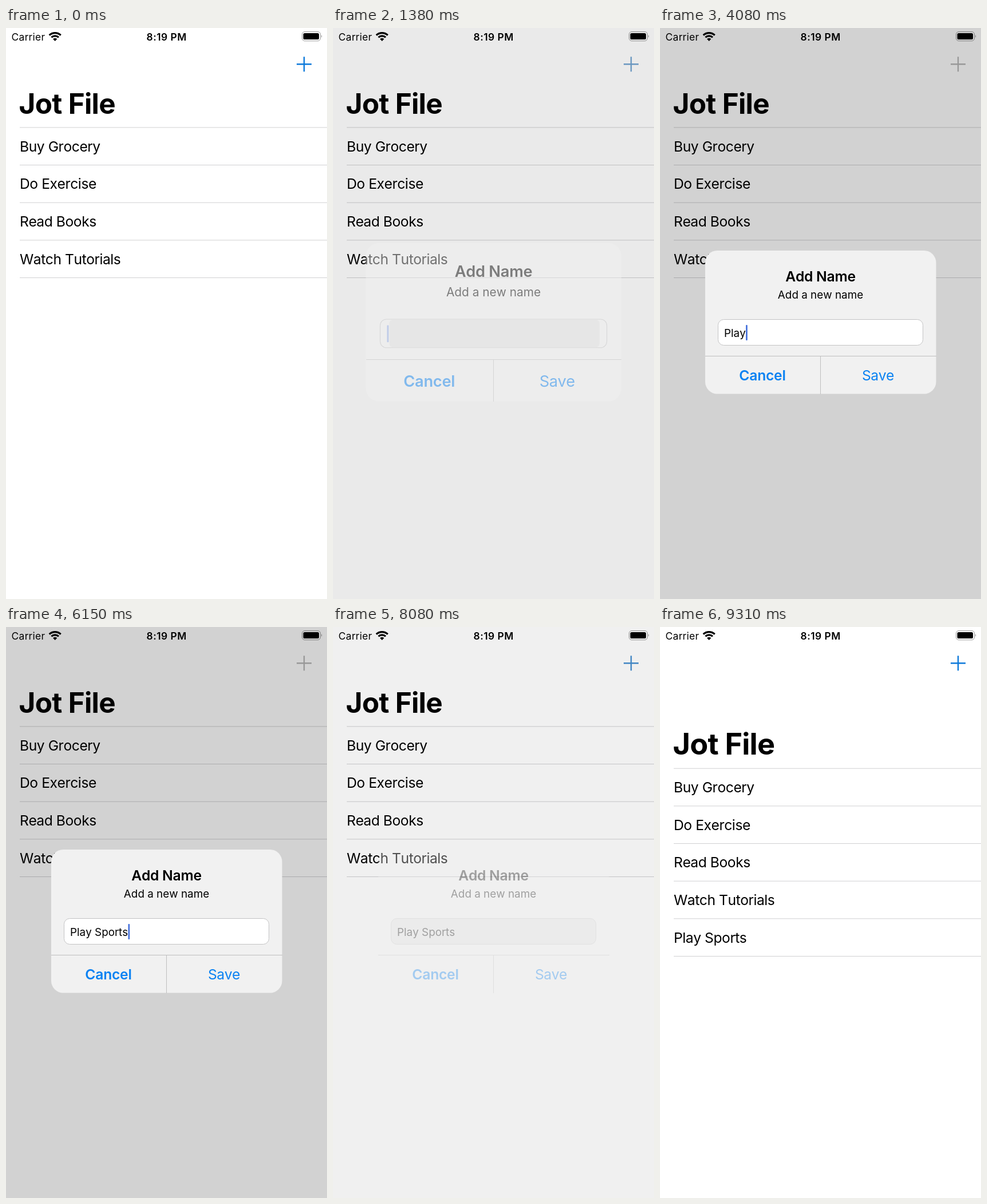
Recreate the animation shown at these times as an HTML page. Size 561 by 998 pixels, loop 9.38 s.

```html
<!DOCTYPE html>
<html lang="en">
<head>
<meta charset="utf-8">
<title>Task list</title>
<style>
  html, body { margin: 0; height: 100%; overflow: hidden; background: #fff; }
  svg { display: block; width: 561px; height: 998px; }
  text {
    font: 24.65px Inter, sans-serif; font-optical-sizing: none; font-kerning: none;
    letter-spacing: -.45px; white-space: pre;
  }
  .mid { text-anchor: middle; }
  .semi { font-weight: 600; letter-spacing: -.25px; }
  .small { font-size: 18.85px; letter-spacing: 0; }
  .status { font-size: 17.4px; letter-spacing: .35px; }
  .status.semi { letter-spacing: .5px; }
  .button { fill: #0a82f2; }
  #heading { font-size: 49.4px; font-weight: 700; letter-spacing: -.7px; }
  .rule { stroke: #d0d0d2; }
  .divider { stroke: #bebebf; shape-rendering: crispEdges; }
</style>
</head>
<body>
<svg viewBox="0 0 561 998">
  <rect width="561" height="998" fill="#fff"/>

  <text class="status" x="9.5" y="21.5">Carrier</text>
  <g fill="none" stroke="#000" stroke-width="3.2">
    <path d="M75.7 12.65A14.4 14.4 0 0 1 95.7 12.65M79.4 16.45A9.1 9.1 0 0 1 92 16.45"/>
    <path d="M85.7 23L82.1 19.25A5.2 5.2 0 0 1 89.3 19.25Z" fill="#000" stroke="none"/>
  </g>
  <text class="status semi mid" x="280.7" y="21.5">8:19 PM</text>
  <rect x="517.5" y="6.5" width="32" height="16" rx="4.5" fill="none" stroke="#999"/>
  <rect x="519.5" y="9" width="27.5" height="11" rx="2.6"/>
  <path d="M551 12Q553.4 14.5 551 17Z" fill="#999"/>
  <path id="plus" d="M508 63.2H534M521 50.2V76.2" stroke-width="2.4"/>

  <text id="heading">Jot File</text>
  <g id="list"><path class="rule" d="M24 173.9H561"/></g>

  <rect id="dim" width="561" height="998"/>

  <g id="alert">
    <rect x="79" y="389" width="403.5" height="250.5" rx="21" fill="#f1f1f1"/>
    <path id="pressed" d="M281 573H482.5V618.5A21 21 0 0 1 461.5 639.5H281Z" fill="#dfdfe0"/>
    <text class="semi mid" x="280.5" y="443">Add Name</text>
    <text class="small mid" x="280.5" y="473">Add a new name</text>
    <rect id="field" x="101.5" y="509.5" width="358" height="45" rx="10" stroke="#c3c3c4"/>
    <rect id="editor" x="116" y="510" width="332" height="44" rx="6"/>
    <text id="typed" class="small" x="112" y="539.7"></text>
    <rect id="caret" y="519" width="2.7" height="27" rx="1" fill="#4470dc"/>
    <path class="divider" d="M79 573.5H482.5M280.5 573V639.5"/>
    <text class="button semi mid" x="179" y="615.8">Cancel</text>
    <text class="button mid" x="381" y="615.8">Save</text>
  </g>
</svg>
<script>
const LOOP = 9380, FPS = 13, TOP = 173.9, ROW = 65.65;
const ITEMS = ["Buy Grocery", "Do Exercise", "Read Books", "Watch Tutorials", "Play Sports"];
const ENTRY = ITEMS[4];

// All times below are in ticks of 1/13 s.
const KEYSTROKES = [47, 49, 51, 53, 59, 65, 69, 73, 75, 78, 80];
const CARET = [[18, .55], [23, 1], [24, 1], [26, 0], [28, 0], [31, 1], [36, 1], [39, 0], [41, 0],
  [44, 1], [86, 1], [89, 0], [91, 0], [93, 1], [99, 1], [102, 0]];
const PLUS = [[13, 1], [14, .25], [15, .25], [18, .85], [20, 1]];
const DISMISS = [[103, 1], [104, .96], [105, .33], [106, .17], [107, .08], [108, .04], [110, 0]];
const PULL = [[117, 0], [118, 30], [119, 95], [120, 135], [121, 73.3]];

const $ = id => document.getElementById(id);
const mix = (a, b, k) => a + (b - a) * k;
const gray = v => `rgb(${v},${v},${v})`;
const set = (id, attrs) => {
  for (const name in attrs) $(id).setAttribute(name, attrs[name]);
};

function track(keys, n) {
  const i = keys.findIndex(key => key[0] > n);
  if (i === 0) return keys[0][1];
  if (i < 0) return keys[keys.length - 1][1];
  const [a, from] = keys[i - 1], [b, to] = keys[i];
  return mix(from, to, (n - a) / (b - a));
}

// Critically damped spring from 0 to 1.
function spring(x) {
  return x <= 0 ? 0 : 1 - (1 + x) * Math.exp(-x);
}

function presence(n) {
  if (n < 16) return 0;
  return n < 23 ? spring((n - 15.67) * .677) : track(DISMISS, n);
}

ITEMS.forEach((label, i) => {
  const y = TOP + ROW * i;
  $("list").insertAdjacentHTML("beforeend",
    `<g><text x="24" y="${y + 41.9}">${label}</text><path class="rule" d="M24 ${y + ROW}H561"/></g>`);
});
const lastRow = $("list").lastElementChild;

function draw(n) {
  const opening = n < 23;
  const shown = presence(n);
  const scale = opening ? mix(1.2, 1, shown) : 1;
  const pull = track(PULL, n);

  set("heading", { transform: `translate(22.5 ${150 + pull}) scale(${1 + pull * .00075})` });
  set("list", { transform: `translate(0 ${pull})` });
  lastRow.setAttribute("visibility", n >= 110 ? "visible" : "hidden");

  const [r, g, b] = [[12, 184], [121, 184], [218, 184]].map(([from, to]) => mix(from, to, shown));
  set("plus", { stroke: `rgb(${r},${g},${b})`, opacity: track(PLUS, n) });
  set("dim", { opacity: .176 * shown });

  set("alert", {
    opacity: shown,
    transform: `translate(280.5 514.5) scale(${scale}) translate(-280.5 -514.5)`
  });
  // While the alert opens, only the inner editor is shaded.
  const clear = shown ** 4;
  set("field", { fill: gray(mix(opening ? 241 : 226, 255, clear)) });
  set("editor", { fill: gray(mix(226, 255, clear)), opacity: opening ? 1 : 0 });
  set("pressed", { opacity: n >= 101 && n < 104 ? 1 : 0 });

  const typed = $("typed");
  typed.textContent = ENTRY.slice(0, KEYSTROKES.filter(k => k <= n).length);
  const width = typed.textContent ? typed.getComputedTextLength() : 0;
  set("caret", { x: 112.3 + width, opacity: track(CARET, n) });
}

const start = performance.now();
function frame() {
  const t = (performance.now() - start) % LOOP;
  draw(Math.floor((t + 5) * FPS / 1000));
  requestAnimationFrame(frame);
}
frame();
</script>
</body>
</html>
```
